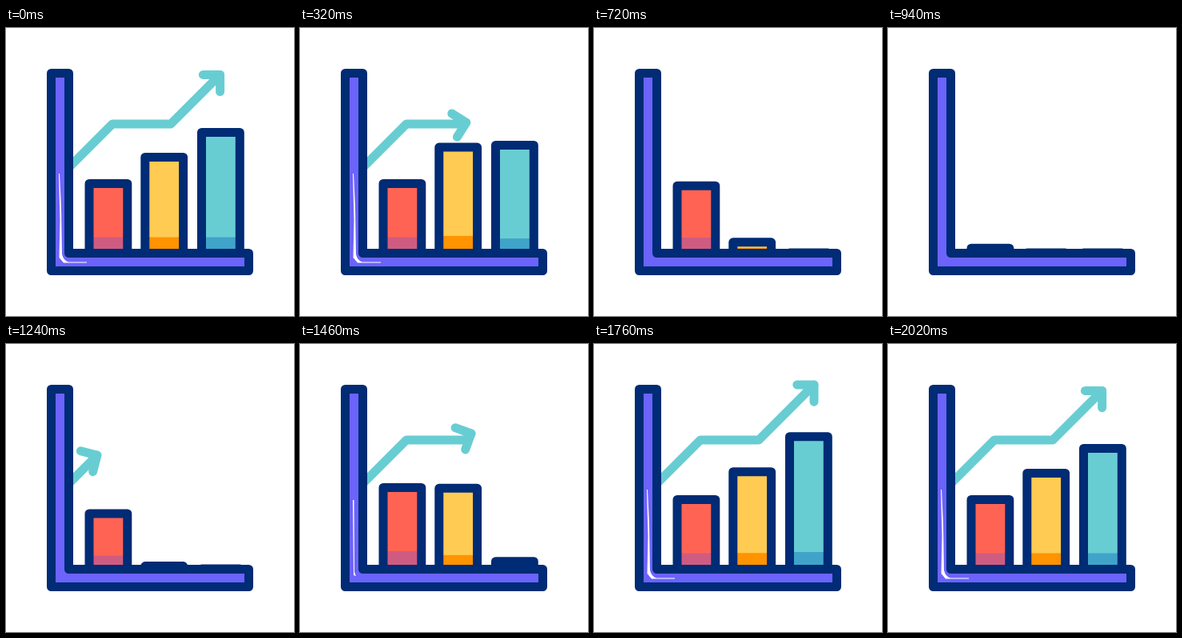
These frames come from a looping animation (360x360 px, 2220 ms). An HTML page with a canvas:

```html
<!DOCTYPE html>
<html lang="en">
<head>
<meta charset="utf-8">
<title>Growing chart</title>
<style>
html, body { margin: 0; width: 100%; height: 100%; overflow: hidden; background: #fff; }
canvas { display: block; }
</style>
</head>
<body>
<canvas width="360" height="360"></canvas>
<script>
const ctx = document.querySelector('canvas').getContext('2d');
const LOOP = 2220, STEP = 20, HALF = 1000;
const NAVY = '#002b75', PURPLE = '#6c63fb', TEAL = '#68cdd2';
const BASE = 275.5;

// x, resting top, fill, foot colour, delay
const bars = [
  [104, 189, '#ff6354', '#cf5c80', 0],
  [173.8, 156, '#ffcb52', '#ff9300', 200],
  [244.5, 125, TEAL, '#40a4ca', 400],
];

const clamp = v => Math.min(1, Math.max(0, v));
const ease = v => (1 - Math.cos(Math.PI * clamp(v))) / 2;

function stroke(points, color) {
  ctx.beginPath();
  points.forEach(p => ctx.lineTo(...p));
  ctx.strokeStyle = color;
  ctx.stroke();
}

// Point on the trend line: diagonal, level, diagonal
function trendPoint(d) {
  const slope = (Math.min(d, 68) + Math.max(d - 141, 0)) * Math.SQRT1_2;
  return [85 + slope + 73 * clamp((d - 68) / 73), 168 - slope];
}

function drawArrow(t) {
  const d = t < HALF
    ? 228 - 245 * ease(t / 800)
    : -17 + 255.5 * ease((t - HALF) / 760) - 10.5 * ease((t - 1760) / 240);
  const turn = clamp((d - 28) / 40) - clamp((d - 134) / 33) - 1;
  ctx.save();
  ctx.beginPath();
  ctx.rect(80, 0, 280, 360);
  ctx.clip();
  stroke([[61, 192], ...[68, 141, d].map(end => trendPoint(Math.min(end, d)))], TEAL);
  ctx.translate(...trendPoint(d));
  ctx.rotate(turn * Math.PI / 4);
  stroke([[-15, -15], [0, 0], [-15, 15]], TEAL);
  ctx.restore();
}

function drawBar([x, rest, fill, foot, delay], s) {
  const full = BASE - rest, u = s - delay;
  const h = (full + 19) * ease(u / 400) - 19 * ease((u - 400) / 200);
  const top = BASE - h + 5.5, footH = 15 * h / full;
  ctx.fillStyle = fill;
  ctx.fillRect(x, top, 47.8, 281.5 - top);
  ctx.fillStyle = foot;
  ctx.fillRect(x, 276.5 - footH, 47.8, footH);
  ctx.strokeStyle = NAVY;
  ctx.strokeRect(x, top, 47.8, 281.5 - top);
}

function drawAxis(s) {
  const shape = new Path2D('M56.5 56.5H78.5V281.5H303.5V303.5H56.5Z');
  ctx.fillStyle = PURPLE;
  ctx.fill(shape);
  ctx.strokeStyle = NAVY;
  ctx.stroke(shape);
  if (s < 440) return;
  // Thin glint inside the frame
  ctx.fillStyle = '#fff';
  ctx.fill(new Path2D(s < 500
    ? 'M66 195L67.5 195L68 285L70 290L67 289Z'
    : 'M66 182H67L69 225L70 283Q72 291 78 292.5H101V293.5H72L66.5 287L67.5 240Z'));
}

function draw(now) {
  const t = Math.min(Math.floor(now % LOOP / STEP) * STEP, 2 * HALF);
  const s = Math.abs(t - HALF);
  ctx.clearRect(0, 0, 360, 360);
  ctx.lineWidth = 11;
  ctx.lineJoin = ctx.lineCap = 'round';
  drawArrow(t);
  bars.forEach(bar => drawBar(bar, s));
  drawAxis(s);
  requestAnimationFrame(draw);
}
draw(0);
</script>
</body>
</html>
```
